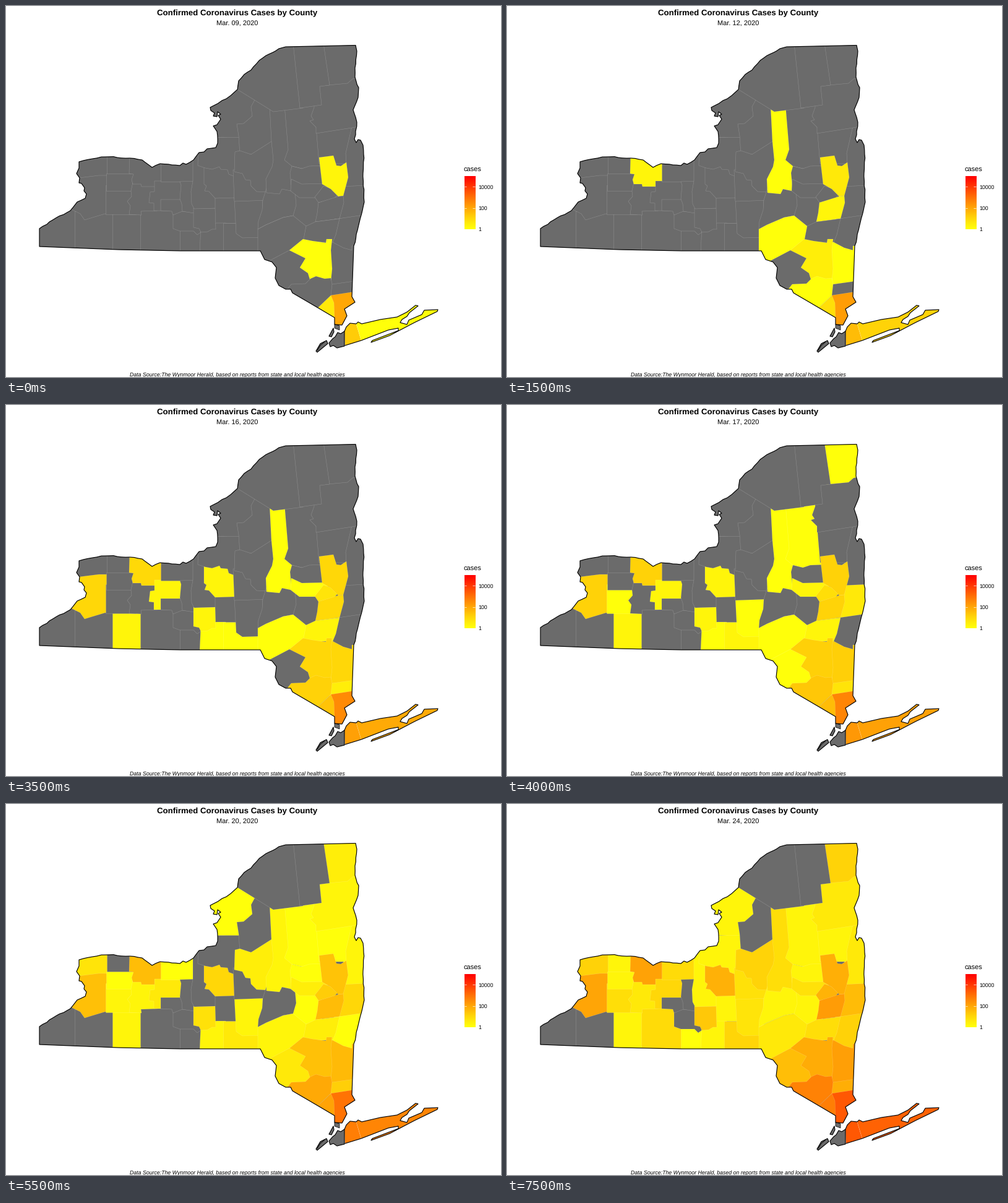
Recreate the animation shown at these times as a matplotlib script. Size 800 by 600 pixels, loop 8000 ms.

```python
import numpy as np
import matplotlib.pyplot as plt
from matplotlib.animation import FuncAnimation
from matplotlib.patches import Polygon

W, H, DPI = 800, 600, 100
PX = 72 / DPI
DAYS = 16
GREY = "#6b6b6b"

plt.rcParams["font.family"] = "Liberation Sans"
plt.rcParams["text.hinting"] = "none"
fig = plt.figure(figsize=(W / DPI, H / DPI), dpi=DPI, facecolor="white")
ax = fig.add_axes([0, 0, 1, 1])
ax.set_axis_off()
rng = np.random.default_rng(4)


def pairs(*flat):
    return np.reshape(flat, (-1, 2)).astype(float)


def ramp(t):
    """Yellow to red for t in 0..1."""
    t = np.asarray(t, float)
    return np.stack([np.ones_like(t), 1 - t ** 1.15, 0.04 * (1 - t)], axis=-1)


def rough(points, step=6, amp=0.5):
    """Subdivide a shoreline and roughen it slightly."""
    out = []
    for a, b in zip(points[:-1], points[1:]):
        n = max(1, int(np.hypot(*(b - a)) / step))
        part = a + (b - a) * np.arange(n)[:, None] / n
        part[1:] += rng.normal(0, amp, (n - 1, 2))
        out.append(part)
    return np.vstack(out + [points[-1:]])


def outlined(points, lw=1.15):
    ax.add_patch(Polygon(points, fc=GREY, ec="none", zorder=1))
    ax.add_patch(Polygon(points, fc="none", ec="black", lw=lw * PX,
                         joinstyle="round", zorder=5))


lakes = rough(pairs(
    54, 360, 82, 342, 104, 331, 115, 317, 128, 311, 130, 304, 126, 299, 127, 294,
    122, 287, 118, 286, 119, 278, 114, 271, 118, 262, 118, 252, 140, 247, 160, 244,
    200, 246, 220, 249, 236, 261, 249, 255, 281, 258, 286, 254, 291, 256, 303, 249,
    312, 237, 320, 236, 325, 231, 339, 229, 342, 222, 341, 203, 335, 194, 341, 192,
    347, 183, 343, 177, 347, 175, 342, 171, 341, 179, 335, 178, 337, 173, 331, 169,
    330, 164, 356, 150, 374, 135, 376, 121, 415, 84, 441, 69, 452, 66))
east = rough(pairs(
    565, 63.5, 567, 73, 564, 100, 564, 115, 570, 132, 569, 148, 561, 168, 567, 188,
    563, 215, 566, 221, 569, 216, 573, 217, 577, 225, 578, 240, 577, 270, 579, 317,
    571, 350, 562, 388))
south = pairs(
    559, 470, 564, 479, 547, 490, 551, 501, 543, 516, 531, 515, 531, 504, 504, 488,
    463, 464, 460, 458, 452, 458, 441, 452, 435, 440, 437, 423, 430, 414, 418, 410,
    411, 396, 282, 396, 181, 394, 54, 389)
mainland = np.vstack([lakes, east, south])
outlined(mainland)
land = Polygon(mainland, fc="none", ec="none")
ax.add_patch(land)

# New York City stays uncoloured
outlined(pairs(501, 558, 508, 546, 518, 541, 520, 546, 503, 560))
ax.plot([503, 508, 515], [557, 549, 543], color="black", lw=0.9 * PX)
outlined(pairs(522, 534, 529, 521, 530, 527, 526, 535))
outlined(pairs(531, 515, 539, 517, 539, 524, 531, 521), lw=0.7)
outlined(pairs(532, 535, 536, 528, 541, 530, 547, 526, 547, 550, 535, 553, 529, 549,
               524, 551, 522, 545, 528, 538))

counties = []


def county(name, shape, start=DAYS, first=1, last=1, ease=1, clip=True):
    """Each county covers part of the earlier ones; four numbers make a box.
    Cases grow from first on the start day to last on the final day."""
    if len(shape) == 4:
        x0, y0, x1, y1 = shape
        shape = (x0, y0, x1, y0, x1, y1, x0, y1)
    patch = Polygon(pairs(*shape), ec=(1, 1, 1, 0.25), lw=0.5 * PX,
                    zorder=2 + len(counties) / 100)
    ax.add_patch(patch)
    if clip:
        patch.set_clip_path(land)
    counties.append((patch, start, first, last, ease))


def cases(day, start, first, last, ease):
    if day < start:
        return 0
    f = (day - start) / (DAYS - 1 - start)
    return round(first * (last / first) ** (f ** ease))


# West
county("Chautauqua", (50, 320, 130, 400))
county("Cattaraugus", (111, 332, 200, 400))
county("Allegany", (172, 330, 230, 400), 6, 2, 2)
county("Steuben", (217, 325, 290, 400), 12, 3, 8)
county("Erie", (100, 260, 173, 260, 173, 337, 160, 336, 140, 342, 127, 346, 120, 336,
                108, 330, 100, 325), 5, 7, 107, 1.2)
county("Niagara", (100, 235, 170, 235, 170, 274, 150, 274, 118, 278, 100, 278), 10, 4, 13)
county("Orleans", (163, 235, 215, 275), 14, 1, 2)
county("Wyoming", (160.5, 290, 210, 337), 8, 1, 7)
county("Genesee", (162, 270.5, 215, 298.5), 10, 1, 2)
county("Livingston", (205, 285, 245, 285, 245, 331, 218, 332, 219, 338, 199, 337,
                      201, 323, 196, 316, 203, 308, 202, 299), 9, 1, 4)
county("Monroe", (200, 235, 260, 235, 260, 292, 219, 292, 218, 288, 205, 288, 203, 281,
                  206, 272, 199, 271), 2, 1, 118, 0.8)
county("Ontario", (240, 283, 290, 283, 290, 331, 239, 331, 239, 319, 231, 318,
                   233, 301, 240, 300), 5, 1, 10)
county("Wayne", (249.5, 235, 310, 283.5), 11, 1, 8)
county("Yates", (250, 313, 295, 313, 295, 336, 270, 338, 268, 332, 250, 331))
county("Chemung", (281, 360, 320, 400), 14)
county("Schuyler", (270, 338, 285, 332, 320, 335, 315, 366, 309, 370, 303, 364,
                    281, 364, 270, 360))
county("Seneca", (281, 284, 310, 283, 310, 336, 285, 332, 284, 320, 281, 312, 283, 290))

# Centre
county("Cortland", (335, 305, 375, 351), 12, 1, 2)
county("Tioga", (315, 355, 340, 351, 355, 351, 355, 400, 313, 400), 5, 1, 2)
county("Broome", (350.5, 351, 410, 400), 6, 1, 11)
county("Tompkins", (303, 327, 338, 327, 339, 361, 333, 361, 326, 365, 315, 366,
                    312, 360, 303, 358), 5, 1, 21)
county("Cayuga", (302, 230, 325, 230, 338, 305, 338, 327, 304, 328, 300, 320,
                  299, 300, 302, 283), 14, 1, 2)
county("Onondaga", (320, 255, 370, 255, 370, 310, 338, 311, 328, 300, 321, 299,
                    324, 291, 320, 288), 6, 1, 60)
county("Oswego", (311, 215, 385, 210, 385, 250, 368, 275, 360, 272, 358, 265, 347, 264,
                  345, 260, 333, 264, 322, 262, 310, 258), 14, 1, 2)
county("Jefferson", (320, 120, 410, 212), 9, 1, 2)
county("Lewis", (403, 150, 430, 150, 435, 240, 378, 240, 376, 210, 373, 191, 384, 190,
                 398, 178, 396, 163))
county("Chenango", (369, 310, 415, 310, 415, 374, 382, 375, 372, 368), 8, 1, 5)
county("Madison", (367, 265, 425, 265, 425, 314, 369, 316), 12, 1, 6)
county("Oneida", (370, 236, 378, 234, 396, 240, 440, 212, 440, 302, 405, 300, 396, 291,
                  395, 282, 387, 281, 382, 271, 369, 268), 10, 2, 12)
county("Otsego", (421, 295, 470, 295, 470, 338, 448, 342, 420, 354, 407, 361, 408, 348,
                  414, 330, 415, 314), 14, 1, 2)
county("Delaware", (407, 361, 420, 354, 448, 342, 464, 339, 500, 339, 500, 420,
                    400, 420, 407, 396), 3, 1, 4, 2)
county("Schoharie", (467, 300, 510, 300, 510, 356, 485, 356, 464, 339, 469, 322), 10, 1, 2)
county("Herkimer", (426, 160, 460, 160, 465, 300, 446, 296, 442, 304, 421, 302,
                    420, 280, 430, 260, 432, 249, 429, 219), 3, 1, 7, 2)
county("Hamilton", (450, 160, 510, 160, 510, 262, 478, 263, 462, 259, 450, 249,
                    456, 232), 8, 1, 2)
county("Fulton", (462, 259, 478, 263, 490, 259, 515, 258, 515, 290, 461, 290,
                  459, 270), 10, 1, 2)
county("Montgomery", (461, 280, 478, 288, 520, 287, 520, 310, 474, 310, 460, 299), 5, 1, 6)

# East and north
county("Washington", (545, 190, 585, 300), 9, 1, 4)
county("Warren", (501, 195, 559, 195, 555, 212, 549, 238, 550, 255, 506, 255), 9, 1, 2)
county("Rensselaer", (540, 292, 585, 290, 585, 344, 535, 344), 8, 4, 37)
county("Schenectady", (513, 291, 540, 300, 530, 312, 505, 318, 499, 309, 507, 299), 4, 2, 55)
county("Saratoga", (506, 245, 529, 242, 534, 258, 541, 259, 550, 253, 553, 277, 545, 307,
                    537, 308, 525, 296, 511, 288), 0, 2, 66)
county("Essex", (498, 120, 580, 105, 580, 193, 559, 197, 501, 206, 501, 196, 491, 186,
                 497, 184, 493, 178, 498, 164), 9, 1, 4)
county("Clinton", (510, 55, 580, 55, 580, 114, 560, 118, 552, 125, 510, 129), 8, 1, 12)
county("St. Lawrence", (374, 135, 360, 110, 440, 50, 480, 50, 480, 165, 432, 171, 403, 153))
county("Franklin", (464, 60, 513, 60, 523, 128, 507, 130, 510, 160, 475, 165))

# Hudson valley
county("Albany", (505, 318, 537, 308, 545, 307, 546, 318, 539, 344, 500, 349,
                  503, 335), 3, 2, 160)
county("Dutchess", (520, 375, 570, 450), 3, 1, 140, 0.7)
county("Columbia", (530, 345, 585, 337, 570, 388, 559, 388, 559, 395, 545, 391,
                    528, 382), 11, 1, 13)
county("Greene", (485, 356, 500, 349, 539, 344, 533, 370, 528, 382, 480, 382), 4, 1, 7)
county("Sullivan", (458, 395, 500, 395, 500, 455, 420, 465, 420, 415), 8, 1, 33)
county("Ulster", (458, 395, 480, 377, 495, 380, 517, 383, 518, 377, 527, 377, 525, 395,
                  527, 425, 525, 445, 492, 445, 488, 432, 475, 423, 484, 408),
       0, 1, 75, 0.8)
county("Putnam", (520, 451, 570, 444, 570, 470, 520, 470), 4, 1, 71)
county("Westchester", (525, 468, 570, 461, 575, 520, 525, 520), 0, 98, 2894, 1.3)
county("Rockland", (525, 468, 530, 480, 531, 510, 490, 500, 504, 488), 0, 4, 592, 1.3)
county("Orange", (461, 450, 484, 449, 492, 441, 501, 437, 515, 441, 525, 440, 527, 450,
                  525, 468, 504, 488, 490, 500, 445, 470), 3, 1, 498, 0.8)

# Long Island
nassau = (547, 526, 550, 519, 556, 513, 566, 514, 574, 541, 548, 549)
suffolk = (566, 514, 569, 511, 575, 514, 605, 507, 632, 503, 648, 495, 662, 484, 666, 485,
           652, 496, 648, 502, 640, 507, 637, 512, 648, 515, 651, 508, 672, 499,
           676, 492, 698, 491, 697, 494, 660, 512, 620, 533, 590, 544, 592, 541,
           634, 525, 634, 521, 618, 524, 574, 541)
county("Nassau", nassau, 0, 17, 2869, 1.2, clip=False)
county("Suffolk", suffolk, 0, 1, 1880, 0.7, clip=False)
shore = np.vstack([pairs(*nassau)[:4], pairs(*suffolk)[1:], pairs(*nassau)[4:]])
ax.plot(*shore.T, color="black", lw=1.15 * PX, solid_joinstyle="round", zorder=5)


def label(x, y, text, size, **kw):
    return ax.text(x, y, text, fontsize=size * PX, va="baseline", **kw)


label(373.5, 15, "Confirmed Coronavirus Cases by County", 13.2, ha="center", weight="bold")
subtitle = label(373.5, 32, "", 11, ha="center")
label(373.5, 599, "Data Source:The Wynmoor Herald, based on reports from state "
      "and local health agencies", 8.8, ha="center", style="italic")

# Legend
label(740, 268, "cases", 11)
ax.imshow(ramp(np.linspace(1, 0, 86))[:, None], extent=(740.5, 757.8, 361, 275),
          aspect="auto", interpolation="bilinear")
for power in (0, 2, 4):
    y = 361 - 17.2 * power
    label(763.5, y + 3.3, str(10 ** power), 8.8)
    for x in (740.5, 754.3):
        ax.plot([x, x + 3.5], [y, y], color="white", lw=0.7 * PX, solid_capstyle="butt")

ax.set_xlim(0, W)
ax.set_ylim(H, 0)


def draw(day):
    subtitle.set_text(f"Mar. {9 + day:02d}, 2020")
    for patch, *growth in counties:
        n = cases(day, *growth)
        patch.set_facecolor(ramp(np.log10(n) / 5) if n else GREY)


anim = FuncAnimation(fig, draw, frames=DAYS, interval=500, repeat=True, repeat_delay=0)
plt.show()
```
